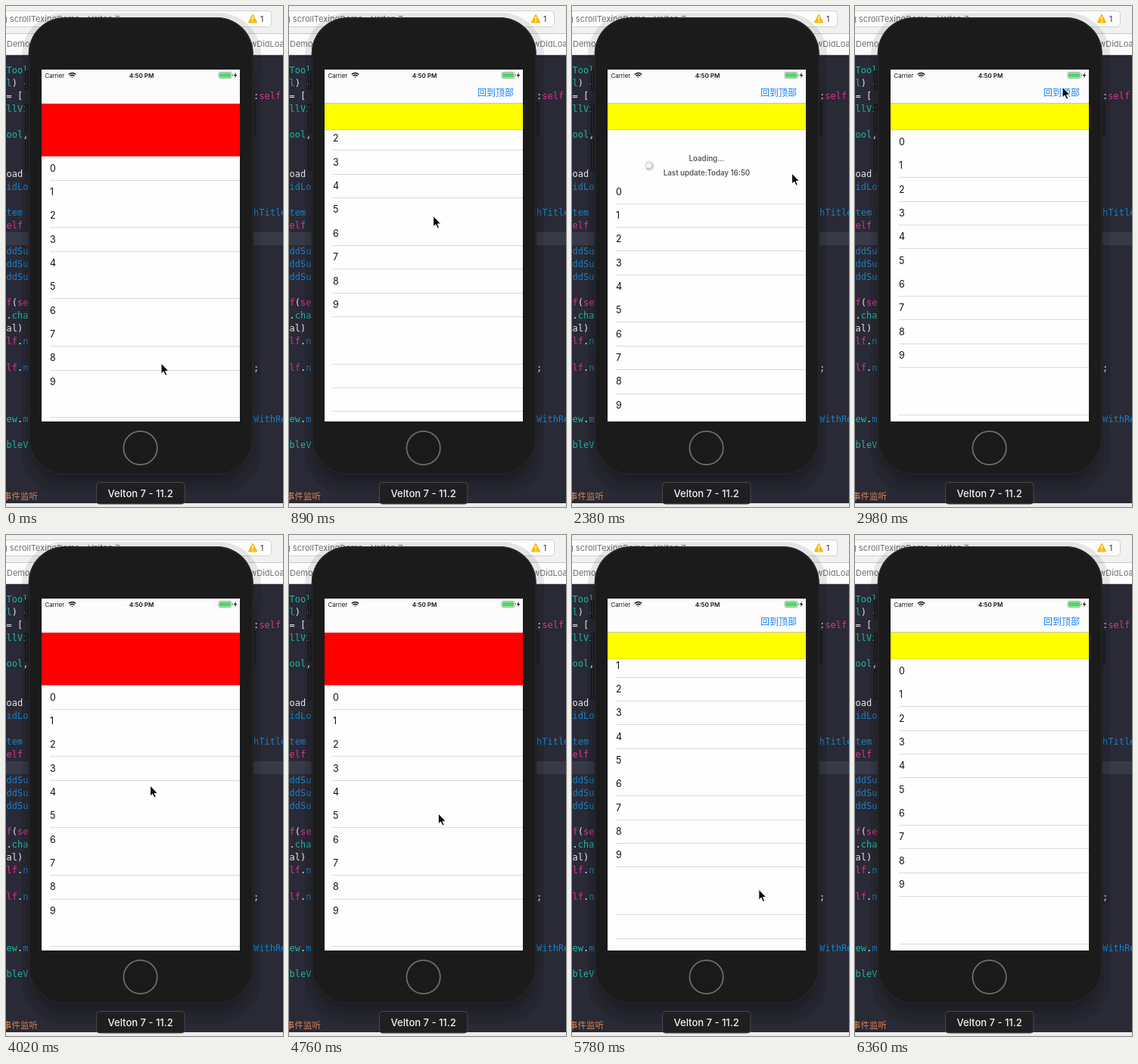
These frames come from a looping animation (366x662 px, 6.51 s). An HTML page:

```html
<!DOCTYPE html>
<html lang="en">
<head>
<meta charset="utf-8">
<title>Scroll demo</title>
<style>
html, body { margin: 0; width: 100%; height: 100%; overflow: hidden; background: #292a35; }
svg { display: block; width: 366px; height: 662px; font-family: Inter, Roboto, sans-serif; }
.code { font: 12px "DejaVu Sans Mono", "Noto Sans Mono", monospace; white-space: pre; }
.cjk { font-family: "Noto Sans CJK SC", "Noto Sans CJK", sans-serif; }
.mid { text-anchor: middle; }
</style>
</head>
<body>
<svg viewBox="0 0 366 662">
  <defs>
    <clipPath id="screen"><rect x="47" y="84" width="262" height="465"/></clipPath>
    <filter id="soft" x="-20%" y="-20%" width="140%" height="140%"><feGaussianBlur stdDeviation="6"/></filter>
  </defs>

  <rect width="366" height="662" fill="#292a35"/>
  <rect width="366" height="37" fill="#f1f1f1"/>
  <rect x="-10" y="6.5" width="360.5" height="21" rx="4" fill="#fcfcfc" stroke="#d2d2d2"/>
  <rect y="37" width="366" height="28" fill="#fdfdfd"/>
  <path d="M0 36.5H366M0 64.5H366" stroke="#c9c9c9"/>
  <rect y="299" width="366" height="17" fill="#383a4a"/>
  <rect y="657" width="366" height="5" fill="#ececec"/>
  <g fill="#6f6f6f" font-size="11">
    <text x="-5" y="21">g scrollTexingDemo › Velton 7</text>
    <text x="1" y="54">Demo</text>
    <text x="316" y="54">ewDidLoad</text>
  </g>
  <path d="M326 12L331 21.5H321Z" fill="#fbb90b" stroke="#fbb90b" stroke-width="2" stroke-linejoin="round"/>
  <path d="M326 14V18M326 19.6V21" stroke="#fff" stroke-width="1.4"/>
  <text x="336" y="21" font-size="10.5" fill="#333">1</text>
  <g id="code" class="code"></g>
  <text class="cjk" x="-4" y="652" font-size="11.5" fill="#d98252">事件监听</text>

  <rect x="32" y="70" width="293" height="560" rx="46" fill="#000" opacity=".22" filter="url(#soft)"/>
  <rect x="21" y="9" width="316" height="637" rx="56" fill="#000" opacity=".09"/>
  <path d="M25.5 86H29V110H25.5ZM25.5 130H29V167H25.5ZM25.5 178H29V217H25.5ZM327 127.5H330V170H327Z" fill="#23232b" stroke="#111116"/>
  <rect x="29.7" y="15" width="297" height="604.5" rx="48" fill="#1b1b1b"/>
  <rect x="30.7" y="16" width="295" height="602.5" rx="47" fill="none" stroke="#272727" stroke-width="1.5"/>
  <circle cx="177.6" cy="584" r="22.2" fill="#1a1a1a" stroke="#6c6c6c" stroke-width="1.8"/>
  <rect x="119.5" y="629.5" width="116.5" height="28.5" rx="4" fill="#1f1f21" stroke="#48484b"/>
  <text class="mid" x="177.6" y="649" font-size="13" font-weight="500" fill="#f2f2f2">Velton 7 - 11.2</text>

  <g clip-path="url(#screen)">
    <rect x="47" y="84" width="262" height="466" fill="#fefefe"/>
    <g id="table">
      <g id="rows" font-size="12.4" fill="#101010"></g>
      <g id="loader">
        <g class="mid" font-size="9.7" font-weight="600" fill="#5c5c5c">
          <text x="178" y="-24.5">Loading...</text>
          <text x="178" y="-6">Last update:Today 16:50</text>
        </g>
        <g id="spin" stroke="#777" stroke-width="1.1" stroke-linecap="round"></g>
      </g>
    </g>
    <g id="yellow">
      <rect x="47" y="129" width="262" height="35" fill="#ff0"/>
      <path d="M47 163.5H309" stroke="#e0e010"/>
    </g>
    <rect id="red" x="47" width="262" height="69.6" fill="#f00"/>
    <rect x="47" y="84" width="262" height="45" fill="#fcfcfc"/>
    <rect id="tint" x="47" y="84" width="262" height="45" fill="#f7c4c3"/>
    <g id="nav">
      <path d="M47 128.5H309" stroke="#c6c6b4"/>
      <text class="cjk" x="249" y="118.5" font-size="12" fill="#1680fa">回到顶部</text>
    </g>
    <text x="51.5" y="94.7" font-size="7.9" fill="#111">Carrier</text>
    <text class="mid" x="179" y="94.7" font-size="8" font-weight="600" fill="#111">4:50 PM</text>
    <g fill="none" stroke="#111" stroke-width="1.5">
      <path d="M82.8 90.5Q87.5 86.7 92.2 90.5M84.5 92.5Q87.5 90.2 90.5 92.5"/>
      <path d="M86.3 93.4H88.7L87.5 95Z" fill="#111" stroke="none"/>
    </g>
    <rect x="281" y="87.5" width="17" height="8" rx="1.8" fill="none" stroke="#8a8a8a" stroke-width=".7"/>
    <rect x="282" y="88.5" width="15" height="6" rx="1" fill="#4cd964"/>
    <path d="M299.3 90V93" stroke="#8a8a8a"/>
    <path d="M304 87.8L300.8 92H302.8L302 95.3L305.3 90.9H303.2Z" fill="#111"/>
  </g>
  <path id="cursor" d="M0 0V14L3.2 11.2L5.5 16.3L7.8 15.3L5.6 10.4H10Z" fill="#0a0a0a" stroke="#fff"/>
</svg>
<script>
const $ = id => document.getElementById(id);
const LOOP = 6510, STEPS = 44;
const PITCH = 31.36, HEADER = 69.6, NAV = 129;
const OPEN_TOP = NAV + HEADER, PINNED_TOP = NAV + HEADER / 2;

function add(parent, tag, attrs, text) {
  const el = document.createElementNS("http://www.w3.org/2000/svg", tag);
  for (const k in attrs) el.setAttribute(k, attrs[k]);
  if (text !== undefined) el.textContent = text;
  parent.append(el);
  return el;
}

// One row per editor line; "~" starts the part right of the phone, "|" splits "colour:text"
const COLORS = { t: "#1fb5a5", w: "#e6e6e6", p: "#dc3394", b: "#1880c8" };
const CODE = `t:Tool
t:l|w:) -
w: = [~w::|p:self
t:llVi

t:ool|w:,


w:oad
b:idLoa

b:tem~b:hTitle
p:elf

b:ddSu
b:ddSu
b:ddSu

p:f|w:(|p:se
w:.|t:cha
w:al)
p:lf|w:.|b:n

p:lf|w:.|b:n~w:;



t:ew|w:.|b:m~b:WithRe

t:bleV`;
CODE.split("\n").forEach((row, k) => row.split("~").forEach((part, side) => {
  const line = add($("code"), "text", { x: side ? 327 : 0.5, y: 89 + k * 17.07 });
  for (const p of part.split("|")) add(line, "tspan", { fill: COLORS[p[0]] }, p.slice(2));
}));

const rules = [], spokes = [];
for (let i = 0; i < 14; i++) {
  if (i < 10) add($("rows"), "text", { x: 58, y: i * PITCH + 20 }, i);
  rules.push(add($("rows"), "rect", { x: 58, width: 251, height: 1, fill: "#dadadc" }));
}
for (let i = 0; i < 12; i++)
  spokes.push(add($("spin"), "path", { d: "M0 -3.3V-6.2", transform: `translate(102 -18.5) rotate(${i * 30})` }));

// Key points are [step, ...values], eased in between
const SCROLL = [
  [4, OPEN_TOP], [7, 61], [11, PINNED_TOP], [14, 229.6], [17, 229.6], [20, PINNED_TOP],
  [22, PINNED_TOP], [25, OPEN_TOP], [34, OPEN_TOP], [38, 118], [42, PINNED_TOP]
];
const POINTER = [
  [2, 205, 472], [7, 189, 255], [13, 214, 400], [16, 290.5, 221], [18, 300, 122], [20, 274, 107],
  [22, 274, 107], [27, 190.5, 331], [34, 199, 377], [36, 198, 336], [43, 322, 672]
];

function track(keys, n) {
  const i = keys.findIndex(k => k[0] > n);
  if (i < 1) return keys.at(i).slice(1);
  const a = keys[i - 1], b = keys[i], f = (n - a[0]) / (b[0] - a[0]);
  const e = f * f * (3 - 2 * f);
  return a.slice(1).map((v, j) => v + (b[j + 1] - v) * e);
}

const show = (el, on) => el.setAttribute("display", on ? "inline" : "none");

function draw(n) {
  const [top] = track(SCROLL, n), [x, y] = track(POINTER, n);
  // The red header is swapped for the pinned one once it is scrolled away
  const open = n < 6 || (n >= 23 && n < 38);
  const gap = top > PINNED_TOP ? 4 : 0;
  $("table").setAttribute("transform", `translate(0 ${top})`);
  // Some hairlines vanish at the reduced screen scale
  rules.forEach((r, i) => {
    r.setAttribute("y", Math.round(top + (i + 1) * PITCH - 0.3) - top);
    show(r, i % 5 !== gap && !(open && gap && i % 5 === 1));
  });
  $("red").setAttribute("y", top - HEADER);
  $("tint").setAttribute("opacity", Math.max(0, Math.min(1, (OPEN_TOP - top) / 35)));
  show($("red"), open);
  show($("tint"), open);
  show($("yellow"), !open || top < PINNED_TOP);
  show($("nav"), !open);
  show($("loader"), n > 11 && n < 20);
  spokes.forEach((s, i) => s.setAttribute("opacity", 0.25 + ((i + 10 * n) % 12) / 20));
  $("cursor").setAttribute("transform", `translate(${x} ${y})`);
}

// The picture is held for each step
const start = performance.now();
function tick(now) {
  const t = Math.max(0, now - start) % LOOP;
  draw(Math.min(STEPS - 1, Math.floor((t + 10) / LOOP * STEPS)));
  requestAnimationFrame(tick);
}
tick(start);
</script>
</body>
</html>
```
